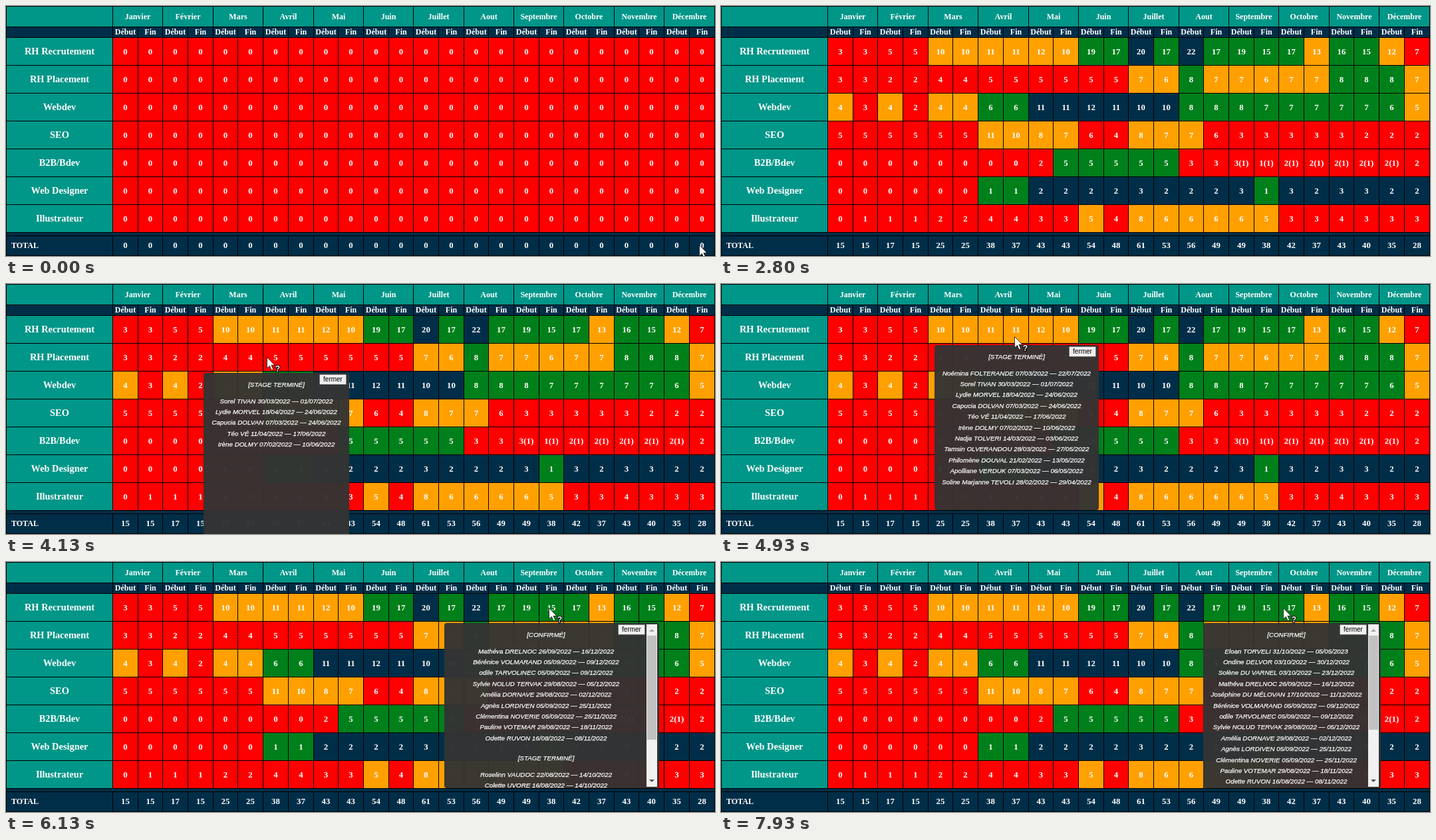
An HTML page for the animation above (8000 ms loop, 1066 by 377 pixels).

```html
<!DOCTYPE html>
<html lang="fr">
<head>
<meta charset="utf-8">
<title>Planning des stages</title>
<style>
  html, body { margin: 0; width: 100%; height: 100%; overflow: hidden; background: #000; }
  svg { display: block; }
  text { fill: #fff; text-anchor: middle; }
  .table text { font: bold 12px "Liberation Serif", "Times New Roman", serif; }
  .table .label { font-size: 14.4px; }
  .table .value { font-size: 12.8px; }
  .table .total { text-anchor: start; }
  .tip text { font: italic 9.8px "Liberation Sans", Arial, sans-serif; stroke: #fff; stroke-width: .25px; }
  .tip .close { font: 10px "Liberation Sans", Arial, sans-serif; fill: #000; stroke: none; }
  .menu { filter: drop-shadow(0 2px 4px rgba(0, 0, 0, .55)); }
  .mark { font: bold 12px "Liberation Sans", Arial, sans-serif; stroke: #000; stroke-width: 2px; paint-order: stroke; }
</style>
</head>
<body>
<svg id="stage" width="1066" height="377" viewBox="0 0 1066 377"></svg>
<script>
const LOOP = 8000, TICK = 200 / 3, COLS = 24, COL_W = 37.69, LEFT = 160;
const TEAL = '#009688', NAVY = '#002e48';
const LEVELS = ['#f00', '#ffa000', '#00801a', NAVY];
const MENU_OPEN = 1600, MENU_CLOSE = 2600, DATA_READY = 2800;
const TIP_H = 249;

const MONTHS = 'Janvier Février Mars Avril Mai Juin Juillet Aout Septembre Octobre Novembre Décembre'.split(' ');

// label, values ("v*n" repeats v), lowest value for orange, green and navy
const ROWS = [
  ['RH Recrutement', '3*2 5*2 10*2 11*2 12 10 19 17 20 17 22 17 19 15 17 13 16 15 12 7', [10, 14, 20]],
  ['RH Placement', '3*2 2*2 4*2 5*6 7 6 8 7*2 6 7*2 8*3 7', [6, 8, 99]],
  ['Webdev', '4 3 4 2 4*2 6*2 11*2 12 11 10*2 8*3 7*5 6 5', [4, 6, 10]],
  ['SEO', '5*6 11 10 8 7 6 4 8 7*2 6 3*5 2*3', [7, 12, 99]],
  ['B2B/Bdev', '0*8 2 5*5 3*2 3(1) 1(1) 2(1)*5 2', [5, 5, 99]],
  ['Web Designer', '0*6 1*2 2*4 3 2*3 3 1 3 2 3*2 2*2', [1, 1, 2]],
  ['Illustrateur', '0 1*3 2*2 4*2 3*2 5 4 8 6*4 5 3*2 4 3*3', [5, 9, 99]]
].map(([label, runs, limits]) => ({
  label, limits,
  values: runs.split(' ').flatMap(run => {
    const [value, count = 1] = run.split('*');
    return Array(+count).fill(value);
  })
}));

const DONE = '[STAGE TERMINÉ]', CONFIRMED = '[CONFIRMÉ]';
const stays = text => text.trim().split('\n').map(line => {
  const [, name, from, to, year = '2022'] = line.trim().match(/^(.+) (\S{5}) (\S{5})(?: (\d{4}))?$/);
  return `${name} ${from}/2022 — ${to}/${year}`;
});

const spring = stays(`Noémina FOLTERANDE 07/03 22/07
  Sorel TIVAN 30/03 01/07
  Lydie MORVEL 18/04 24/06
  Capucia DOLVAN 07/03 24/06
  Téo VÉ 11/04 17/06
  Irène DOLMY 07/02 10/06
  Nadja TOLVERI 14/03 03/06
  Tamsin OLVERANDOU 28/03 27/05
  Philomène DOUVAL 21/02 13/05
  Apolliane VERDUK 07/03 06/05
  Soline Marjanne TEVOLI 28/02 29/04`);
const autumn = stays(`Mathéva DRELNOC 26/09 16/12
  Bérénice VOLMARAND 05/09 09/12
  odile TARVOLINEC 05/09 09/12
  Sylvie NOLUD TERVAK 29/08 05/12
  Amélia DORNAVE 29/08 02/12
  Agnès LORDIVEN 05/09 25/11
  Clémentina NOVERIE 05/09 25/11
  Pauline VOTEMAR 29/08 18/11
  Odette RUVON 16/08 08/11`);
const summer = stays(`Roselinn VAUDOC 22/08 14/10
  Colette UVORE 16/08 14/10`);
const [eloan, martin, anselmin, rose, ondine, solene, josephine] = stays(`Eloan TORVELI 31/10 05/05 2023
  Martin GOUVERNEL 21/11 10/03 2023
  Anselmin DOV 07/11 20/01 2023
  Rose-lucie ULVENO 21/11 13/01 2023
  Ondine DELVOR 03/10 30/12
  Solène DU VARNEL 03/10 23/12
  Joséphine DU MÉLOVAN 17/10 11/12`);

const TIPS = {
  short: { width: 219, groups: [[DONE, spring.slice(1, 6)]] },
  spring: { width: 247, groups: [[DONE, spring]] },
  autumn: { width: 323, thumb: 157, groups: [[CONFIRMED, autumn], [DONE, summer]] },
  october: { width: 267, thumb: 142, groups: [[CONFIRMED,
    [eloan, ondine, solene, autumn[0], josephine, ...autumn.slice(1)]]] },
  winter: { width: 252, groups: [[CONFIRMED,
    [eloan, martin, anselmin, rose, ondine, solene, autumn[0], josephine, ...autumn.slice(1, 5)]]] }
};

// pointer way-points: time, x, y
const PATH = [
  [0, 1042, 360], [200, 985, 336], [600, 650, 178], [867, 523, 106],
  [1067, 478, 23], [1133, 470, -40],
  [2800, 428, -40], [2867, 425, 11], [3133, 410, 35], [3267, 410, 35],
  [3333, 409, 50], [3467, 407, 53], [3667, 370, 92], [3867, 325, 104],
  [4133, 392, 110], [4467, 468, 108], [4733, 415, 91], [4800, 415, 91],
  [4933, 441, 79], [5667, 658, 71], [6133, 816, 69], [6533, 925, 70],
  [6733, 995, 69], [7067, 1002, 72], [7200, 1002, 72], [7933, 845, 69]
];

function add(parent, tag, attrs = {}, content = '') {
  const node = document.createElementNS('http://www.w3.org/2000/svg', tag);
  for (const key in attrs) node.setAttribute(key, attrs[key]);
  node.textContent = content;
  return parent.appendChild(node);
}
const edge = col => Math.round(LEFT + COL_W * col);
const rowTop = row => 47 + 42 * row;

const stage = document.getElementById('stage');
const table = add(stage, 'g', { class: 'table' });

// A cell lies between two one-pixel grid lines.
function cell(x0, y0, x1, y1, fill, label = '', className = '', baseline = y1 - 4) {
  const rect = add(table, 'rect', { x: x0 + 1, y: y0 + 1, width: x1 - x0 - 1, height: y1 - y0 - 1, fill });
  const text = add(table, 'text', { x: (x0 + x1 + 1) / 2, y: baseline, class: className }, label);
  return { rect, text };
}

cell(0, 0, 160, 31, TEAL);
cell(0, 31, 160, 47, NAVY);
MONTHS.forEach((month, i) => {
  const [a, b, c] = [edge(2 * i), edge(2 * i + 1), edge(2 * i + 2)];
  cell(a, 0, c, 31, TEAL, month, '', 20);
  cell(a, 31, b, 47, NAVY, 'Début');
  cell(b, 31, c, 47, NAVY, 'Fin');
});

const valueCells = ROWS.map(({ label }, r) => {
  const top = rowTop(r), bottom = top + 42;
  cell(0, top, 160, bottom, TEAL, label, 'label', top + 26);
  return Array.from({ length: COLS }, (_, c) =>
    cell(edge(c), top, edge(c + 1), bottom, LEVELS[0], '0', 'value', top + 26));
});

add(table, 'rect', { x: 1, y: 342, width: 1064, height: 4, fill: NAVY });
cell(0, 346, 160, 376, NAVY);
add(table, 'text', { x: 8, y: 365, class: 'total' }, 'TOTAL');
const totalCells = Array.from({ length: COLS }, (_, c) =>
  cell(edge(c), 346, edge(c + 1), 376, NAVY, '0', 'value', 365));

const tip = add(stage, 'svg', { class: 'tip', height: TIP_H, overflow: 'hidden' });
const menu = add(stage, 'rect', { class: 'menu', x: 375, y: -8, width: 113, height: 55 });
const pointer = add(stage, 'g');
add(pointer, 'path', {
  d: 'M.5.5V17L4.4 13.4 7.2 19.8 9.8 18.7 7 12.4H12Z', fill: '#fff', stroke: '#111', 'stroke-width': .8
});
const mark = add(pointer, 'text', { class: 'mark', x: 16.5, y: 22 }, '?');

let filled = null;
function fillTable(ready) {
  if (ready === filled) return;
  filled = ready;
  const sums = Array(COLS).fill(0);
  ROWS.forEach(({ values, limits }, r) => valueCells[r].forEach(({ rect, text }, c) => {
    const shown = ready ? values[c] : '0', amount = parseInt(shown);
    sums[c] += amount;
    text.textContent = shown;
    rect.setAttribute('fill', LEVELS[limits.filter(limit => amount >= limit).length]);
  }));
  totalCells.forEach(({ text }, c) => text.textContent = sums[c]);
}

function tipName(row, col) {
  if (row > 0) return 'short';
  if (col < 11) return 'spring';
  if (col < 18) return 'autumn';
  return col < 22 ? 'october' : 'winter';
}

function drawScrollbar(x, thumb) {
  add(tip, 'rect', { x, y: 2, width: 16, height: TIP_H - 4, fill: '#f1f1f1' });
  add(tip, 'rect', { x: x + 1, y: 19, width: 14, height: thumb, fill: '#c1c1c1' });
  add(tip, 'path', { d: `M${x + 4} 13h8l-4-4z`, fill: '#a3a3a3' });
  add(tip, 'path', { d: `M${x + 4} 236h8l-4 4z`, fill: '#505050' });
}

let tipKey = '';
function showTip(row, col) {
  const key = row < 0 ? '' : `${row}/${col}`;
  if (key === tipKey) return;
  tipKey = key;
  tip.replaceChildren();
  if (!key) return;

  const { width, thumb, groups } = TIPS[tipName(row, col)];
  const right = thumb ? width - 17 : width;
  tip.setAttribute('x', Math.round((edge(col) + edge(col + 1) - width) / 2 + 1));
  tip.setAttribute('y', rowTop(row) + 45);
  tip.setAttribute('width', width);
  add(tip, 'rect', { width, height: TIP_H, rx: 4, fill: '#333', 'fill-opacity': .96 });

  let y = 20.5;
  for (const [title, lines] of groups) {
    add(tip, 'text', { x: right / 2, y }, title);
    y += 25;
    for (const line of lines) {
      add(tip, 'text', { x: right / 2, y }, line);
      y += 16.4;
    }
    y += 13.4;
  }
  if (thumb) drawScrollbar(right - 2, thumb);
  add(tip, 'rect', {
    x: right - 44.5, y: 2.5, width: 40, height: 15, rx: 1, fill: '#efefef', stroke: '#767676'
  });
  add(tip, 'text', { class: 'close', x: right - 24.5, y: 13 }, 'fermer');
}

function pointerAt(time) {
  const next = PATH.findIndex(([t]) => t > time);
  if (next < 0) return PATH.at(-1).slice(1);
  const [t0, x0, y0] = PATH[next - 1], [t1, x1, y1] = PATH[next];
  const k = (time - t0) / (t1 - t0);
  return [x0 + (x1 - x0) * k, y0 + (y1 - y0) * k].map(Math.round);
}

function render(now) {
  const time = Math.floor((now % LOOP + 3.4) / TICK) * TICK % LOOP;
  const reached = at => time > at - 5;
  const ready = reached(DATA_READY);
  const [x, y] = pointerAt(time);
  const overValues = y > 47 && y < 341 && x > 160;

  fillTable(ready);
  showTip(ready && overValues ? Math.floor((y - 47) / 42) : -1, Math.floor((x - LEFT) / COL_W));
  menu.style.display = reached(MENU_OPEN) && !reached(MENU_CLOSE) ? '' : 'none';
  pointer.setAttribute('transform', `translate(${x} ${y})`);
  mark.style.display = overValues ? '' : 'none';
}

const start = performance.now();
function loop() {
  render(performance.now() - start);
  requestAnimationFrame(loop);
}
loop();
</script>
</body>
</html>
```
